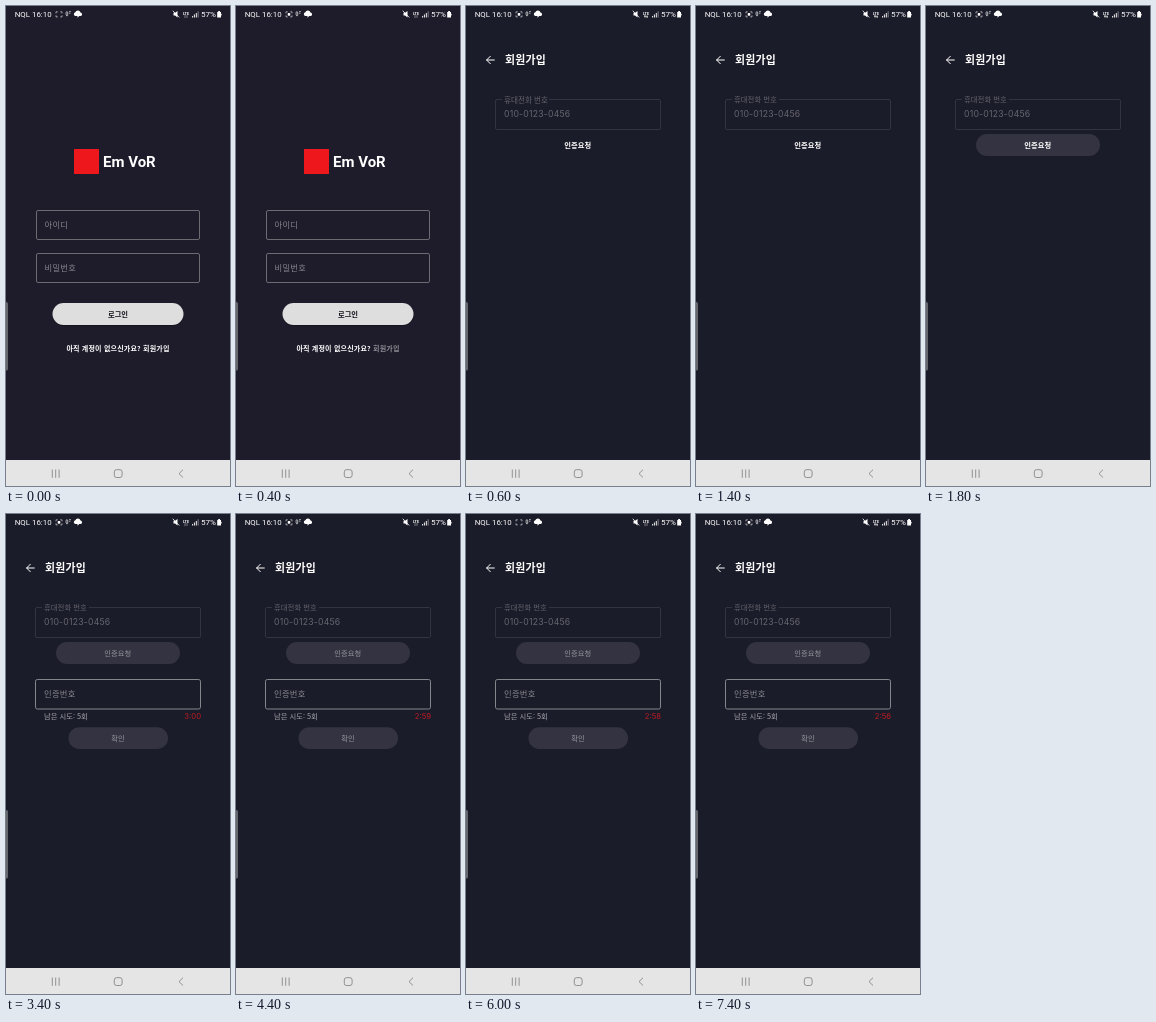
These frames come from a looping animation (224x480 px, 8 s). An HTML page:

```html
<!DOCTYPE html>
<html lang="ko">
<head>
<meta charset="utf-8">
<style>
  html, body { margin: 0; height: 100%; overflow: hidden; background: #1b1c29; }
  svg { display: block; width: 100vw; height: 100vh; }
  text { font: 7.3px "Noto Sans CJK KR", "Noto Sans CJK", sans-serif; fill: #fff; }
  .latin { font-family: Roboto, sans-serif; }
  .digits { font-family: Inter, sans-serif; }
  .bold { font-weight: 700; }
  .mid { text-anchor: middle; }
  .input { font-size: 8.3px; letter-spacing: .25px; fill: #85858c; }
  .line { fill: none; stroke: #fff; stroke-linecap: round; stroke-linejoin: round; }
  .box { fill: none; stroke: #6c6b72; }
  .pill { fill: #343341; }
  .nav { fill: none; stroke: #7c7c7e; stroke-width: .8; }
</style>
</head>
<body>
<svg viewBox="0 0 224 480">
  <rect id="bg" width="224" height="480"/>

  <g id="login">
    <rect x="68" y="143" width="25" height="25" fill="#ee171b"/>
    <text class="latin bold" x="97" y="161" style="font-size:15px">Em VoR</text>
    <rect class="box" x="30.5" y="204.5" width="163" height="29" rx="1.5"/>
    <text class="input" x="38.5" y="221.6">아이디</text>
    <rect class="box" x="30.5" y="247.5" width="163" height="29" rx="1.5"/>
    <text class="input" x="38.5" y="264.8">비밀번호</text>
    <rect x="46.5" y="298" width="131" height="22" rx="11" fill="#15131d"/>
    <rect x="46.5" y="297" width="131" height="22" rx="11" fill="#dedede"/>
    <text class="bold mid" x="112" y="310.8" style="fill:#17151f">로그인</text>
    <text class="bold mid" x="112" y="345.2" style="font-size:7px;letter-spacing:.2px">아직 계정이 없으신가요? <tspan id="join">회원가입</tspan></text>
  </g>

  <g id="signup">
    <path class="line" d="M28.3 54H20.7M24.3 50.3 20.6 54l3.7 3.7"/>
    <text class="bold" x="39" y="57.9" style="font-size:10.9px;letter-spacing:.2px">회원가입</text>
    <path class="box" style="stroke:#33343f" d="M36 93.5h-5q-1.5 0-1.5 1.5v27q0 1.5 1.5 1.5h162q1.5 0 1.5-1.5V95q0-1.5-1.5-1.5H83"/>
    <text id="label" x="38" style="fill:#62626c">휴대전화 번호</text>
    <text class="digits" x="38" y="111.3" style="font-size:8.7px;letter-spacing:.2px;fill:#666670">010-0123-0456</text>
    <rect id="askPill" class="pill" x="50" y="128" width="124" height="22" rx="11"/>
    <text id="ask" class="bold mid" x="111.8" y="141.6">인증요청</text>
    <g id="verify">
      <rect class="box" style="stroke:#85858c" x="29.5" y="165.5" width="165" height="29.5" rx="1.8"/>
      <text class="input" x="38" y="183.4">인증번호</text>
      <text x="38" y="205" style="fill:#a6a6ad">남은 시도: 5회</text>
      <text id="timer" class="digits" x="195" y="204.8" text-anchor="end" style="font-size:7.7px;fill:#bd1a22"></text>
      <rect class="pill" x="62.5" y="213.3" width="99.5" height="21.7" rx="10.8"/>
      <text class="mid" x="112" y="226.9" style="fill:#96959e">확인</text>
    </g>
  </g>

  <!-- status bar -->
  <text class="latin" x="8.7" y="10.9" style="font-size:7.9px">NQL 16:10</text>
  <path class="line" stroke-width=".7" stroke-opacity=".8" d="M50 7V5.8h1.3M54.7 5.8H56V7M50 9.7v1.2h1.3M54.7 10.9H56V9.7"/>
  <rect id="scan" x="51.7" y="7.1" width="2.6" height="2.6" rx=".8" fill="#fff"/>
  <path class="line" stroke-width=".8" stroke-opacity=".8" d="M60.3 6q1-1 1.4.2v3.2q-.7 1.6-1.4 0zM63.5 5.6h1M63.3 7.2h.8"/>
  <path fill="#fff" d="M69.5 10.1a2 2 0 0 1-.2-3.9 2.8 2.8 0 0 1 5.2.2 1.9 1.9 0 0 1 .2 3.7h-1.5l-1.7 1.6v-1.6z"/>
  <path fill="#fff" d="M167.5 6.8h1.6l2.4-1.8v6.4l-2.4-1.8h-1.6z"/>
  <path class="line" stroke-width=".8" d="M167 5l6 6.2"/>
  <text class="latin bold mid" x="180" y="8.5" style="font-size:3.8px">LTE</text>
  <path class="line" stroke-width=".6" stroke-opacity=".7" d="M179 11.7V9.5M181 9.2v2.3"/>
  <path id="data" fill="#fff" d="M178 10.7l1-1.7 1 1.7zM180.2 10.3h1.8l-.9 1.7z"/>
  <path fill="#ddd" d="M186 11.5V10h1.1v1.5zM187.9 11.5v-3h1.1v3zM189.8 11.5V7h1.1v4.5z"/>
  <path fill="#777783" d="M191.6 11.5V5.3h1.1v6.2z"/>
  <text class="latin" x="195" y="10.9" style="font-size:8.1px">57%</text>
  <path fill="#fff" d="M211.2 6h1V5h1.8v1h1v5.6h-3.8z"/>
  <path class="line" stroke-width=".7" d="M213.6 9v-.8q.9-1 1.8 0V9"/>

  <rect x="-2" y="296" width="4" height="68.5" rx="1.6" fill="#66666d"/>

  <rect y="454" width="224" height="26" fill="#e5e5e5"/>
  <path class="nav" d="M46.3 463.5v8.3M49.7 463.5v8.3M53.1 463.5v8.3M177 463.7l-4 3.9 4 3.9"/>
  <rect class="nav" x="108.3" y="463.7" width="7.8" height="7.8" rx="2.2"/>
</svg>
<script>
const LOOP = 8000, SIGNUP = 600, SENT = 3400;
const el = id => document.getElementById(id);
const show = (id, on) => el(id).style.display = on ? '' : 'none';
const between = (t, a, b) => t >= a && t < b;

function draw(t) {
  const signup = t >= SIGNUP, sent = t >= SENT;
  show('login', !signup);
  show('signup', signup);
  el('bg').setAttribute('fill', signup ? '#1b1c29' : '#1e1b2a');
  el('join').setAttribute('fill-opacity', t < 400 ? 1 : .5);

  // the label settles onto the border just after the screen opens
  const floating = t < 800;
  el('label').setAttribute('y', floating ? 97 : 95.6);
  el('label').style.fontSize = floating ? '7.6px' : '7.4px';

  show('askPill', sent || between(t, 1800, 2000));
  el('ask').style.fill = sent ? '#96959e' : '#fff';
  el('ask').style.fontWeight = sent ? 400 : 700;
  show('verify', sent);
  const left = 180 - Math.max(0, Math.floor((t - SENT) / 1000));
  el('timer').textContent = Math.floor(left / 60) + ':' + String(left % 60).padStart(2, '0');

  show('scan', t % 1000 >= 400);
  show('data', between(t, 600, 2600) || between(t, 4600, 5600) || t >= 6600);
}

let start;
function tick(now) {
  start ??= now;
  draw((now - start) % LOOP);
  requestAnimationFrame(tick);
}
draw(0);
requestAnimationFrame(tick);
</script>
</body>
</html>
```
